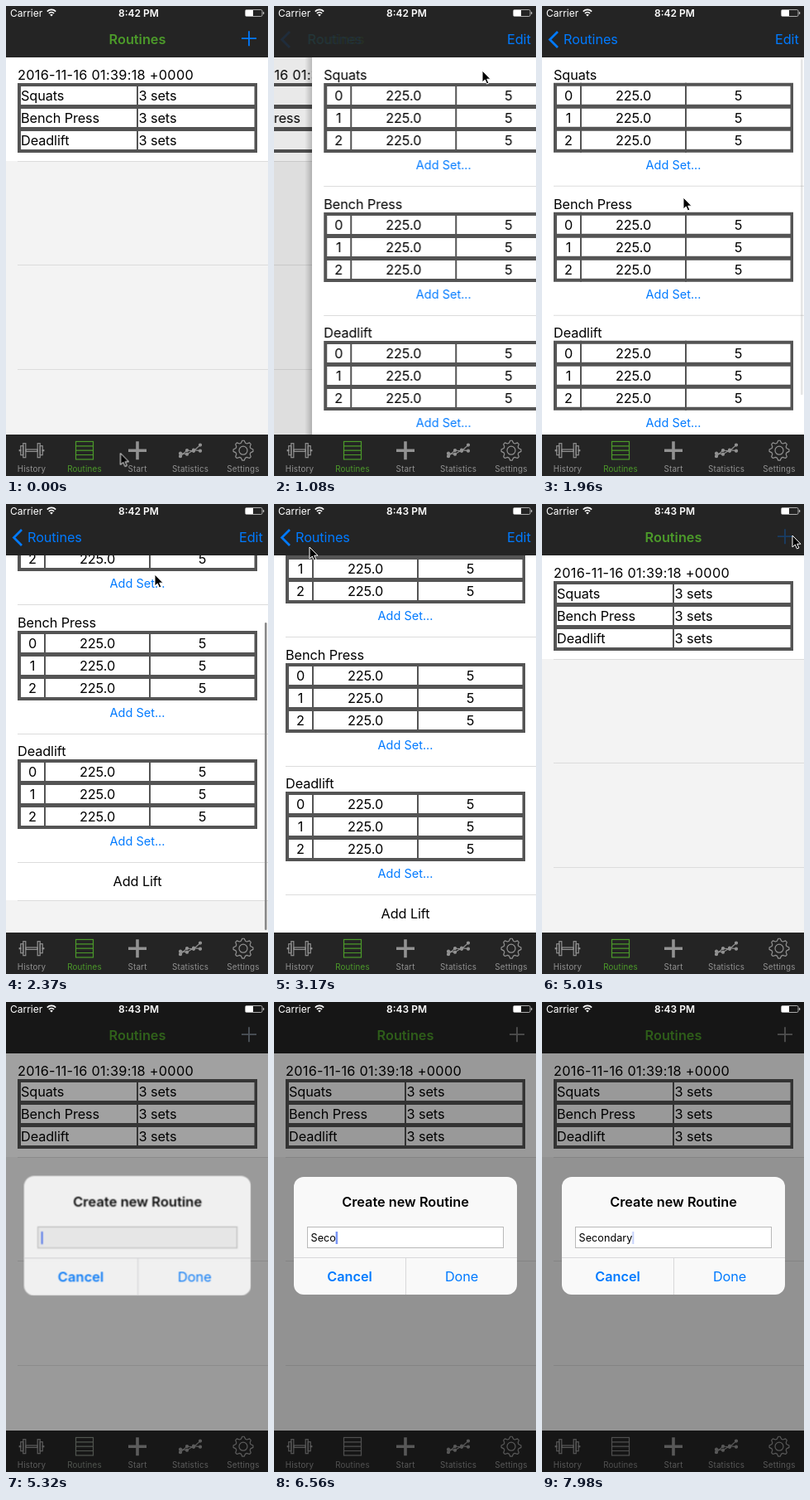
An HTML page that plays this animation: 317 by 567 pixels, repeating every 8000 ms.

```html
<!DOCTYPE html>
<html lang="en">
<head>
<meta charset="utf-8">
<title>Routines</title>
<style>
  html, body { margin: 0; width: 100%; height: 100%; overflow: hidden; background: #242424; }
  svg { display: block; width: 317px; height: 567px; }
  text { font: 400 16.3px Inter, "Open Sans", sans-serif; letter-spacing: -.1px; fill: #000; white-space: pre; }
  .mid { text-anchor: middle; }
  .bold { font-weight: 600; letter-spacing: 0; }
  .date { letter-spacing: .28px; }
  .blue { fill: #007aff; }
  .green { fill: #4c9a2a; }
  .link { font-size: 14.5px; letter-spacing: 0; fill: #007aff; }
  .status { font-size: 12px; letter-spacing: 0; fill: #fff; }
  .tab { color: #929292; }
  .tab text { font-size: 9.8px; letter-spacing: .2px; fill: currentColor; }
  .icon { fill: none; stroke: currentColor; stroke-width: 1.2; }
  #typed { font-size: 12.7px; letter-spacing: 0; }
  #alert { transform-origin: 159px 282px; }
</style>
</head>
<body>
<script>
const LOOP = 8000;
const GLIDE = 'cubic-bezier(.2,.8,.2,1)';
const HOLD = 'steps(1)';
const LIFTS = ['Squats', 'Bench Press', 'Deadlift'];
const BURSTS = { Se: 6200, con: 6450, dar: 6950, y: 7330 };
const WORD = Object.keys(BURSTS).join('');

const rect = (x, y, w, h, fill, more = '') =>
  `<rect x="${x}" y="${y}" width="${w}" height="${h}" fill="${fill}" ${more}/>`;
const text = (x, y, str, cls = '', more = '') =>
  `<text x="${x}" y="${y}" class="${cls}" ${more}>${str}</text>`;
const line = y => rect(14, y, 303, 1, '#dcdcdc');
const each = (list, fn) => list.map(fn).join('');

// Three-row table, split into cells at the given x positions.
const grid = (top, splits) => rect(14, top, 290, 84, '#545454') +
  each([0, 1, 2], r => rect(18, top + 4 + r * 27, 282.5, 22, '#fff')) +
  each(splits, x => rect(x, top, 2, 84, '#545454'));

const listView = () =>
  rect(0, 62, 317, 455, '#f3f3f3') + rect(0, 62, 317, 125, '#fff') +
  text(14, 89, '2016-11-16 01:39:18 +0000', 'date') + grid(93, [158]) +
  each(LIFTS, (name, i) => text(18, 114 + i * 27, name) + text(160.5, 114 + i * 27, '3 sets')) +
  each([0, 1, 2], i => line(Math.round(187 + i * 125.4)));

const section = (name, i) =>
  `<g transform="translate(0 ${Math.round(i * 155.5)})">` + text(14, 89, name) + grid(93, [46, 173]) +
  each([0, 1, 2], r => {
    const y = 114 + r * 27;
    return text(32, y, r, 'mid') + text(110.5, y, '225.0', 'mid') + text(237.5, y, 5, 'mid');
  }) + text(159, 197, 'Add Set...', 'mid link') + line(217) + '</g>';

const detailView = () =>
  rect(-9, 62, 9, 455, 'url(#shadow)', 'id="edge"') + rect(0, 62, 317, 455, '#f3f3f3') +
  '<g id="scroll">' + rect(0, 0, 317, 574, '#fff') + each(LIFTS, section) +
  text(159, 557, 'Add Lift', 'mid') + line(574) + '</g>' +
  rect(313, 64, 2.6, 405, '#8a8a8a', 'id="bar" rx="1.3"');

// Tab icons, each drawn around its own centre.
const outline = (x, w, h) => rect(x - w / 2, -h / 2, w, h, 'none');
const trend = (phase, rise) => {
  const dots = [0, 1, 2, 3].map(i => [i * 8 - 12, 5 - i * rise + (i % 2 ? -phase : phase)]);
  return `<polyline points="${dots.join(' ')}"/>` +
    each(dots, ([x, y]) => `<circle cx="${x}" cy="${y}" r="1.5" fill="currentColor"/>`);
};
const gear = Array.from({ length: 32 }, (_, i) => {
  const r = i % 4 < 2 ? 12 : 9.3, a = (i - .5) * Math.PI / 16;
  return [r * Math.cos(a), r * Math.sin(a)];
}).join(' ');
const icons = {
  History: outline(0, 14, 2.4) + each([-1, 1], s => outline(s * 8.7, 3, 17) + outline(s * 11.7, 3, 11) + outline(s * 14, 1.5, 1)),
  Routines: outline(0, 21, 21.5) + '<path d="M-10.5 -5.3H10.5M-10.5 0H10.5M-10.5 5.3H10.5"/>',
  Start: '<path d="M-11 0H11M0 -11V11" stroke-width="3.6"/>',
  Statistics: trend(2, 3.2) + trend(-1.5, 2),
  Settings: `<polygon points="${gear}" stroke-linejoin="round"/><circle r="5"/>`
};
const tabBar = () => rect(0, 517, 317, 50, '#242424') +
  each(Object.keys(icons), (name, i) =>
    `<g class="tab" id="${name}" transform="translate(${31 + i * 64} 536.2)">` +
    `<g class="icon">${icons[name]}</g>${text(0, 26.3, name, 'mid')}</g>`);

const navBar = () =>
  rect(0, 0, 317, 62, '#242424') +
  text(159, 46, 'Routines', 'mid bold green', 'id="title"') +
  text(26, 46, 'Routines', 'blue', 'id="back"') +
  text(310.7, 46, 'Edit', 'blue', 'id="edit" text-anchor="end"') +
  '<path id="chevron" d="M19 31L9.5 40.5L19 50" fill="none" stroke="#007aff" stroke-width="2.8"/>' +
  '<path id="plus" d="M285 39.2H303M294 30.2V48.2" fill="none" stroke="currentColor" stroke-width="1.8"/>';

const statusBar = () =>
  text(5, 12.5, 'Carrier', 'status') +
  '<path d="M49.8 6.6A7.3 7.3 0 0 1 60.2 6.6M51.9 8.9A4.4 4.4 0 0 1 58.1 8.9" fill="none" stroke="#fff" stroke-width="1.6"/>' +
  '<path d="M53.2 10.6A2.6 2.6 0 0 1 56.8 10.6L55 12.5Z" fill="#fff"/>' +
  each(['8:42 PM', '8:43 PM'], (s, i) => text(160.5, 12.5, s, 'status bold mid', `id="clock${i}"`)) +
  rect(289.5, 4.5, 20.5, 8, 'none', 'rx="1.6" stroke="#bbb" stroke-width=".9"') +
  rect(290, 5, 9, 7, '#fff') + rect(310.9, 7, 1.4, 3, '#bbb', 'rx=".7"');

const alertBox = () => '<g id="alert">' +
  rect(24, 211, 270, 142, '#f9f9f9', 'rx="12"') +
  text(159, 247, 'Create new Routine', 'mid bold') +
  rect(40.5, 271.5, 237, 25, '#fff', 'id="field" stroke="#b9b9b9"') +
  text(44.5, 288.5, each([...WORD], c => `<tspan>${c}</tspan>`), '', 'id="typed"') +
  rect(44.5, 277, 1.8, 15, '#426bf2', 'id="caret"') +
  rect(24, 308, 270, 1, '#d8d8da') + rect(159, 308, 1, 45, '#d8d8da') +
  text(91.5, 337, 'Cancel', 'mid bold blue') + text(227, 337, 'Done', 'mid blue') + '</g>';

document.body.innerHTML = '<svg viewBox="0 0 317 567">' +
  '<linearGradient id="shadow"><stop stop-opacity="0"/><stop offset="1" stop-opacity=".25"/></linearGradient>' +
  `<g id="list">${listView()}</g>` + rect(0, 62, 317, 455, '#000', 'id="shade"') +
  `<g id="detail">${detailView()}</g>` + navBar() + tabBar() +
  rect(0, 0, 317, 567, '#000', 'id="dim"') + alertBox() + statusBar() +
  '<path id="cursor" d="M0 0V14L3.3 11L5.5 16L7.9 15L5.7 10.2H10Z" fill="#000" stroke="#fff"/></svg>';

const $ = id => document.getElementById(id);

// Start at a value, then run legs of [from, to, value]; the value rests in between.
const play = (el, prop, start, legs, easing = 'linear', map = v => v) => {
  const key = (t, v, ease = 'linear') => ({ offset: t / LOOP, [prop]: map(v), easing: ease });
  const keys = [key(0, start)];
  let now = start;
  for (const [from, to, value] of legs) {
    keys.push(key(from, now, easing), key(to, value));
    now = value;
  }
  keys.push(key(LOOP, now));
  el.animate(keys, { duration: LOOP, iterations: Infinity });
};
const shift = ([x, y]) => `translate(${x}px, ${y}px)`;
const move = (id, start, legs, easing) => play($(id), 'transform', start, legs, easing, shift);
const fade = (id, start, ...legs) => play($(id), 'opacity', start, legs);
const jump = (el, prop, a, t, b) => play(el, prop, a, [[t, t, b]]);

// Push to the detail view and pop back, on one shared curve.
const trip = (out, into) => [[897, 1457, into], [4266, 4826, out]];
const slide = (id, out, into) => move(id, [out, 0], trip([out, 0], [into, 0]), GLIDE);
slide('detail', 317, 0);
slide('list', 0, -95);
slide('title', 0, -98);
slide('back', 98, 0);
play($('shade'), 'opacity', 0, trip(0, .1), GLIDE);
play($('edge'), 'opacity', 0, trip(0, 1), GLIDE);
fade('title', 1, [900, 1100, 0], [4440, 4820, 1]);
fade('back', 0, [1040, 1400, 1], [4180, 4400, 0]);
fade('chevron', 0, [1040, 1400, 1], [4150, 4350, 0]);
fade('edit', 0, [900, 1060, 1], [4180, 4400, 0]);
fade('plus', 1, [900, 1020, 0], [4500, 4820, 1], [4950, 5010, .3], [5150, 5300, 1]);

// Drag past the end, then spring back; the bar shrinks while overstretched.
const drag = (top, end, over) => [[1960, 2370, over], [2430, 2850, end]];
move('scroll', [0, 0], drag(0, [0, -57], [0, -96]), GLIDE.replace('.2,.8', '.4,.4'));
play($('bar'), 'y', 64, drag(64, 109, 143), 'ease-out', v => v + 'px');
play($('bar'), 'height', 405, drag(405, 405, 371), 'ease-out', v => v + 'px');
fade('bar', 0, [1950, 2000, 1], [2880, 3130, 0]);

jump($('clock0'), 'opacity', 1, 2950, 0);
jump($('clock1'), 'opacity', 0, 2950, 1);

// Alert over a dimmed backdrop with greyed tint.
const open = (id, prop, a, b, map) => play($(id), prop, a, [[5150, 5550, b]], GLIDE, map);
open('dim', 'opacity', 0, .4);
open('alert', 'opacity', 0, 1);
open('alert', 'transform', 1.2, 1, s => `scale(${s})`);
open('plus', 'color', '#007aff', '#848484');
open('Routines', 'color', '#4c9a2a', '#848484');
play($('field'), 'fill', '#eee', [[5320, 5550, '#fff']]);

// Letters come in short bursts; the caret follows the measured text.
const keyTimes = Object.entries(BURSTS).flatMap(([part, t]) => [...part].map((_, i) => t + i * 80));
const typed = $('typed');
[...typed.children].forEach((el, i) => jump(el, 'fillOpacity', 0, keyTimes[i], 1));
move('caret', [0, 0], keyTimes.map((t, i) => [t, t, [typed.getSubStringLength(0, i + 1), 0]]));
fade('caret', 1, [5780, 5910, 0], [6150, 6200, 1], [7880, 7980, .35]);

move('cursor', [138.5, 539.5], [
  [120, 350, [274, 57]], [560, 660, [252, 78]], [1150, 1810, [171, 231]], [1960, 2370, [180, 85]],
  [2790, 3150, [43, 52]], [4250, 4370, [102, 52]], [4370, 4920, [303, 38]]
], 'ease-in-out');
jump($('cursor'), 'opacity', 1, 5200, 0);
</script>
</body>
</html>
```
